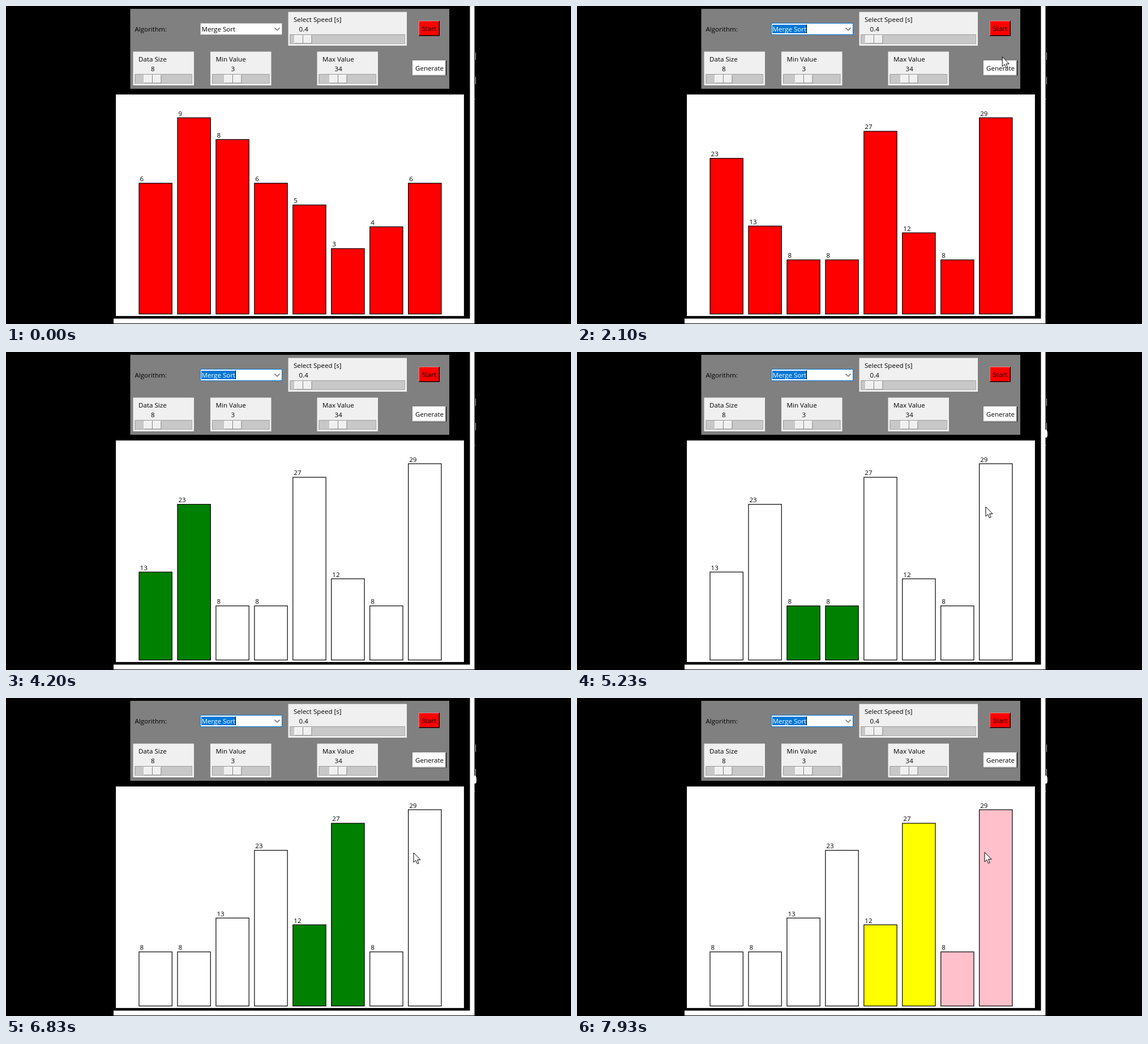
Recreate the animation shown at these times as an HTML page. Size 998 px wide and 561 px high, loop 8000 ms.

```html
<!DOCTYPE html>
<html lang="en">
<head>
<meta charset="utf-8">
<title>Merge sort</title>
<style>
  html, body { margin: 0; width: 100%; height: 100%; overflow: hidden; background: #000; }
  svg { display: block; width: 998px; height: 561px; }
  text { font: 11.6px "Open Sans", "Noto Sans", sans-serif; white-space: pre; }
</style>
</head>
<body>
<svg id="stage" viewBox="0 0 998 561">
  <path fill="#fff" d="M819.5 0h8v560h-637.5v-8.5h629.5z"/>
  <path stroke="#ccc" d="M829.5 82v13M829.5 125v13M827 164.5h1.5"/>
  <path id="blob" fill="#fff" d="M827 137h2q2 2 2 5v5q0 3-2 4h-2z"/>
  <rect x="219.5" y="5" width="563.5" height="141" fill="#808080"/>
  <rect x="194" y="156" width="615" height="391" fill="#fff"/>
  <rect x="194.5" y="156.5" width="614" height="390" fill="none" stroke="#e4e4e4"/>
  <g id="panel"></g>
  <text x="227.5" y="45">Algorithm:</text>
  <rect id="combo" x="343.5" y="30.5" width="144" height="20" fill="#fff"/>
  <rect id="mark" x="345" y="33" width="60" height="15" fill="#0078d7"/>
  <text id="choice" x="345.5" y="45">Merge Sort</text>
  <path id="caret" d="M405.5 32.5v15.5" stroke="#000"/>
  <path d="M474.5 38.5l4.5 4.5 4.5-4.5" fill="none" stroke="#555" stroke-width="1.2"/>
  <g id="start"></g>
  <g id="generate"></g>
  <g id="bars" stroke="#000" stroke-width="1.2"></g>
  <path id="cursor" d="M0 0V17L3.9 13.4L6.5 19.6L9.2 18.4L6.7 12.4H12Z" fill="#fff" stroke="#000"/>
</svg>
<script>
const LOOP = 8000, SORT_AT = 3795, TICK = 403, NEW_DATA_AT = 1900;
const first = [6, 9, 8, 6, 5, 3, 4, 6];
const second = [23, 13, 8, 8, 27, 12, 8, 29];
// left, middle, right of each merge
const merges = [[0, 0, 1], [2, 2, 3], [0, 1, 3], [4, 4, 5], [6, 6, 7], [4, 5, 7]];
// time, x, y of the pointer
const trips = [
  [[200, 390, 85], [960, 753, 105], [1200, 753, 105], [1480, 810, 118],
   [1780, 753, 105], [1930, 753, 105], [2500, 745, 34]],
  [[4233, 745, 40], [4960, 722, 273], [5430, 722, 273], [5600, 720, 273],
   [7200, 720, 273], [7250, 720, 272]]
];
const $ = id => document.getElementById(id);

const rect = (x, y, w, h, fill) =>
  `<rect x="${x}" y="${y}" width="${w}" height="${h}" fill="${fill}"/>`;
const label = (x, y, s) => `<text x="${x}" y="${y}">${s}</text>`;

// a box with light top-left and dark bottom-right edges
function bevel(x, y, w, h, fill, light, dark) {
  return rect(x, y, w, h, fill) +
    `<path d="M${x + .5} ${y + h}V${y + .5}H${x + w}" fill="none" stroke="${light}"/>` +
    `<path d="M${x} ${y + h - .5}H${x + w - .5}V${y}" fill="none" stroke="${dark}"/>`;
}

function scale(x, y, w, title, value, valueX, knob) {
  const half = dx => bevel(knob + dx, y + 41, 15.5, 15, '#f0f0f0', '#fff', '#777');
  return rect(x, y, w, 59.5, '#f0f0f0') +
    bevel(x + 3, y + 39.5, w - 6, 17, '#c8c8c8', '#999', '#aaa') +
    half(0) + half(15.5) +
    label(x + 9.5, y + 17, title) + label(valueX, y + 34.5, value);
}

function button(x, y, w, h, fill, light, dark, caption, textX, down) {
  const [a, b] = down ? ['#000', light] : [light, '#000'];
  const [c, d] = down ? [dark, fill] : [fill, dark];
  const shift = down ? 1 : 0;
  return bevel(x, y, w, h, fill, a, b) + bevel(x + 1, y + 1, w - 2, h - 2, fill, c, d) +
    label(textX + shift, y + h / 2 + 4.5 + shift, caption);
}

$('panel').innerHTML =
  scale(498.5, 10.5, 209.5, 'Select Speed [s]', '0.4', 517.5, 509.5) +
  scale(224.5, 80.5, 107.5, 'Data Size', '8', 256, 243.5) +
  scale(361, 80.5, 107.5, 'Min Value', '3', 397.5, 385.5) +
  scale(549.5, 80.5, 107.5, 'Max Value', '34', 580.5, 571.5);

function state(t) {
  const data = (t < NEW_DATA_AT ? first : second).slice();
  const step = Math.floor((t - SORT_AT) / TICK);
  if (step < 0) return [data, () => 'red'];
  const now = step >> 1, merged = step % 2;
  merges.slice(0, now + merged).forEach(([l, , r]) => {
    const part = data.slice(l, r + 1).sort((a, b) => a - b);
    data.splice(l, part.length, ...part);
  });
  const [l, m, r] = merges[now];
  return [data, i => i < l || i > r ? '#fff' : merged ? 'green' : i <= m ? 'yellow' : 'pink'];
}

function drawBars(t) {
  const [data, color] = state(t), max = Math.max(...data);
  $('bars').innerHTML = data.map((v, i) => {
    const x = 235 + 67.95 * i, h = 346.3 * v / max, y = 543.4 - h;
    return rect(x, y, 58.3, h, color(i)) +
      `<text x="${x + 1.5}" y="${y - 3.6}" stroke="none">${v}</text>`;
  }).join('');
}

function pointer(t) {
  for (const trip of trips) {
    const end = trip === trips[0] ? 2500 : LOOP;
    if (t < trip[0][0] || t >= end) continue;
    const i = trip.findIndex(p => p[0] > t);
    if (i < 0) return trip[trip.length - 1].slice(1);
    const [t0, x0, y0] = trip[i - 1], [t1, x1, y1] = trip[i];
    const u = (t - t0) / (t1 - t0), e = u * u * (3 - 2 * u);
    return [x0 + (x1 - x0) * e, y0 + (y1 - y0) * e];
  }
  return null;
}

const show = (id, on) => $(id).setAttribute('visibility', on ? 'visible' : 'hidden');

function draw(t) {
  const focus = t >= 170;
  $('combo').setAttribute('stroke', focus ? '#0078d7' : '#aaa');
  $('choice').setAttribute('fill', focus ? '#fff' : '#000');
  show('mark', focus);
  // the caret is lit for 600 ms and dark for 300 ms until sorting blocks it
  show('caret', focus && (t >= SORT_AT || (t + 170) % 900 < 600));
  show('blob', t >= 4600);
  $('start').innerHTML = button(729, 26, 37, 27, '#f00', '#ff8080', '#900',
    'Start', 734.5, t >= 3700 && t < SORT_AT);
  $('generate').innerHTML = button(718, 96, 60, 27.5, '#fff', '#fff', '#999',
    'Generate', 723, t >= 1820 && t < NEW_DATA_AT);
  drawBars(t);
  const p = pointer(t);
  show('cursor', p);
  if (p) $('cursor').setAttribute('transform', `translate(${p})`);
}

function frame() {
  draw(performance.now() % LOOP);
  requestAnimationFrame(frame);
}
frame();
</script>
</body>
</html>
```
